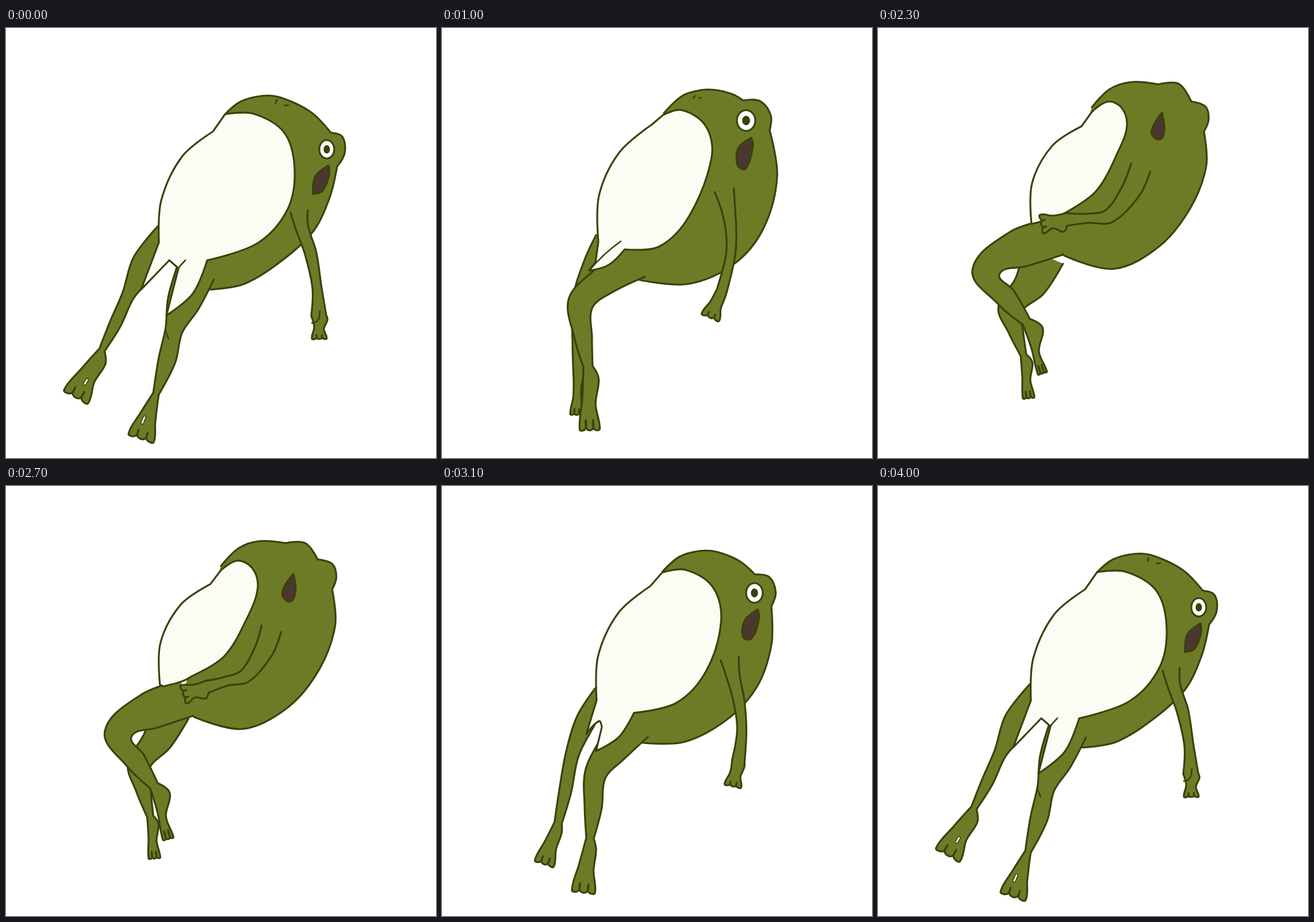
An HTML page that plays this animation: 748 px wide and 748 px high, repeating every 4.1 s.

```html
<!DOCTYPE html>
<html lang="en">
<head>
<meta charset="utf-8">
<title>Breathing frog</title>
<style>
  html, body { margin: 0; width: 100%; height: 100%; overflow: hidden; background: #fff; }
  svg { display: block; width: 100%; height: 100%; }
  svg * { stroke-linecap: round; stroke-linejoin: round; }
</style>
</head>
<body>
<svg id="stage" viewBox="0 0 748 748"></svg>
<script>
const GREEN = '#6e7b26', LINE = '#38420a', CREAM = '#fbfcf3', MOUTH = '#4b372f';
const FRAME = 100, LOOP = 4100;

// Key points for three poses: stretched, upright, sitting.
// Outline: "x,y", with "!" for a corner. Limb: joints "x,y,radius", then tip "x,y,width,heel".
const farLeg = poses(
  '282,356,21 242,412,24 213,464,11 190,515,10 167,560,5 122,641,26,17',
  '278,365,11 258,405,10 240,470,12 238,550,11 237,612,8 234,672,12,6',
  '287,395,38 264,448,28 229,490,20 239,525,13 253,569,5 262,643,11,14');
const nearLeg = poses(
  '330,425,34 308,480,28 292,526,15 280,578,15 261,636,5 235,713,25,8',
  '335,405,33 281,440,25 241,479,22 246,540,15 254,589,8 257,698,19,18',
  '311,363,33 243,385,33 188,424,24 222,468,18 258,511,8 286,600,9,24');
const arm = poses(
  '510,319,15 515,348,11 530,392,10 541,452,8 544,500,13 545,540,14,15',
  '491,282,17 498,315,12 503,355,9 502,395,8 487,456,9 467,503,18,10',
  '457,243,18 440,283,17 402,327,12 365,331,8 328,333,11 285,341,18,20');
const body = poses(
  '381,150! 408,128 446,118 478,121 530,146 565,182! 585,189 589,218 576,241! 563,295 535,353 482,403 415,445 356,455! 325,450',
  '386,148! 418,118 450,108 478,108 505,115 524,126! 553,127 572,152 570,178! 583,258 560,347 510,409 430,445 347,439! 310,430',
  '372,138! 402,107 440,94 488,98! 523,97 545,128! 570,137 575,160 567,180! 571,240 543,314 489,380 410,419 324,396! 300,375');
const belly = poses(
  '350,404! 438,374 490,315 502,245 484,182 430,149 381,150! 360,180! 306,224 270,300 266,373! 235,455! 284,404! 300,418! 279,500! 325,462',
  '318,385! 378,380 430,327 469,225 459,171 418,143 385,151! 365,168! 308,217 273,292 272,372! 267,408! 262,414 256,421! 257,422! 290,412',
  '325,322! 380,283 419,212 433,170 424,139 400,128 372,146! 354,171! 303,205 268,270 267,341! 275,339 285,336 295,333 305,330 315,326');
const mouth = poses(
  '561,239! 538,258 534,289! 551,283 562,256',
  '538,191! 516,208 514,238 528,245 541,205',
  '494,147! 480,168 476,184 490,194 498,178');
// Eye: "x,y,rx,ry"; it is turned away when sitting.
const eye = poses('558,211,13,16', '529,161,16,18', '566,150,8,10');

// Short pen marks: nostrils, creases, fingers.
const marks = [
  'M471 125L469 131M484 135L491 134M312 404Q303 413 300 418M277 526L283 541M546 492L545 504Q540 514 532 513',
  'M440 118L437 122M447 122L450 121M257 421Q280 393 311 371',
  ''
];
const slits = 'M237 687L241 677M137 619L141 612';

function poses(...texts) {
  return texts.map(text => text.split(' ').map(word => ({
    v: word.replace('!', '').split(',').map(Number),
    corner: word.endsWith('!')
  })));
}

function blend(keys, p) {
  const low = Math.min(Math.floor(p), 1), f = p - low, near = keys[Math.round(p)];
  return keys[low].map((a, i) => {
    const v = a.v.map((n, j) => n + (keys[low + 1][i].v[j] - n) * f);
    return { v, x: v[0], y: v[1], corner: near[i].corner };
  });
}

const unit = (a, b) => {
  const len = Math.hypot(b.x - a.x, b.y - a.y) || 1;
  return { x: (b.x - a.x) / len, y: (b.y - a.y) / len };
};

// Smooth path through the points, with handles a third of each span long.
function curve(pts, closed) {
  const n = pts.length, at = i => pts[(i + n) % n];
  const text = (x, y) => `${x.toFixed(1)} ${y.toFixed(1)} `;
  const handle = (i, other, sign) => {
    const q = at(i), end = !closed && (i === 0 || i === n - 1);
    if (q.corner || end) return text(q.x, q.y);
    const d = unit(at(i - 1), at(i + 1));
    const k = sign * Math.hypot(other.x - q.x, other.y - q.y) / 3;
    return text(q.x + d.x * k, q.y + d.y * k);
  };
  let d = 'M' + text(pts[0].x, pts[0].y);
  for (let i = 0; i < (closed ? n : n - 1); i++) {
    const a = at(i), b = at(i + 1);
    d += 'C' + handle(i, b, 1) + handle((i + 1) % n, a, -1) + text(b.x, b.y);
  }
  return closed ? d + 'Z' : d;
}

// Outline of a tapered limb that ends in three round toes.
function limb(joints) {
  const bones = joints.slice(0, -1), tip = joints.at(-1), ankle = bones.at(-1);
  const side = sign => bones.map((q, i) => {
    const a = unit(bones[i - 1] || q, q), b = unit(q, bones[i + 1] || q);
    const d = unit({ x: 0, y: 0 }, { x: a.x + b.x, y: a.y + b.y });
    const r = q.v[2] * sign;
    return { x: q.x + d.y * r, y: q.y - d.x * r, corner: q === ankle };
  });
  const [, , width, heel] = tip.v, d = unit(ankle, tip);
  const foot = (along, out, corner) => ({
    x: ankle.x + (tip.x - ankle.x) * along + d.y * out,
    y: ankle.y + (tip.y - ankle.y) * along - d.x * out,
    corner
  });
  const toes = [-1, 0, 1].flatMap(i => {
    const mid = i * .67 * width, gap = .25 * width;
    const toe = [foot(1, mid - gap), foot(1, mid + gap)];
    return i < 1 ? [...toe, foot(.85, mid + .33 * width, true)] : toe;
  });
  return [...side(-1), foot(.5, -.6 * width), ...toes, foot(.6, .6 * width), foot(.2, heel), ...side(1).reverse()];
}

const stage = document.getElementById('stage');
function add(tag, fill, stroke = LINE, width = 3.2) {
  const el = document.createElementNS('http://www.w3.org/2000/svg', tag);
  set(el, { fill, stroke, 'stroke-width': width });
  return stage.appendChild(el);
}
function set(el, attrs) {
  for (const name in attrs) el.setAttribute(name, attrs[name]);
}

const shapes = [
  { keys: farLeg, fill: GREEN, build: limb },
  { keys: body, fill: GREEN },
  { keys: nearLeg, fill: GREEN, build: limb },
  { keys: belly, fill: CREAM, closed: true, build: swell },
  { keys: arm, fill: GREEN, build: limb },
  { keys: mouth, fill: MOUTH, closed: true }
];
for (const shape of shapes) shape.el = add('path', shape.fill);
const white = add('ellipse', '#fff'), pupil = add('ellipse', LINE, 'none');
const pen = add('path', 'none', LINE, 2.6);
const spots = [add('path', 'none', LINE, 6), add('path', 'none', '#fff', 2.8)];

// Breathing pushes the two points on the belly's back outward.
function swell(pts, k) {
  return pts.map((q, i) => i === 8 || i === 9 ? { ...q, x: q.x - 14 * k, y: q.y - 12 * k } : q);
}

function draw(p, k) {
  for (const { keys, el, build, closed } of shapes) {
    const pts = blend(keys, p);
    set(el, { d: curve(build ? build(pts, k) : pts, closed) });
  }
  const [cx, cy, rx, ry] = blend(eye, p)[0].v;
  const visibility = p < 1.5 ? 'visible' : 'hidden';
  set(white, { cx, cy, rx, ry, visibility });
  set(pupil, { cx, cy, rx: rx * .43, ry: ry * .46, visibility });
  const key = Number.isInteger(p) ? p : 2;
  set(pen, { d: marks[key] });
  for (const el of spots) set(el, { d: key === 0 ? slits : '' });
}

// The loop runs to its middle and back; the frog breathes at both ends.
function show(frame) {
  const u = Math.max(0, Math.min(frame, 39 - frame));
  const rise = Math.max(0, Math.min(1, (u - 6) / 4));
  const turn = Math.sin(Math.max(0, Math.min(1, (u - 10) / 3)) * Math.PI / 2);
  const breath = n => Math.sin(Math.PI * n / 8) ** 2;
  draw(rise + turn, u < 8 ? breath(u) : .35 * breath(Math.max(0, u - 16)));
}

const start = performance.now();
let last = 0;
show(last);
function tick() {
  const frame = Math.floor((performance.now() - start) % LOOP / FRAME);
  if (frame !== last) show(last = frame);
  requestAnimationFrame(tick);
}
requestAnimationFrame(tick);
</script>
</body>
</html>
```
